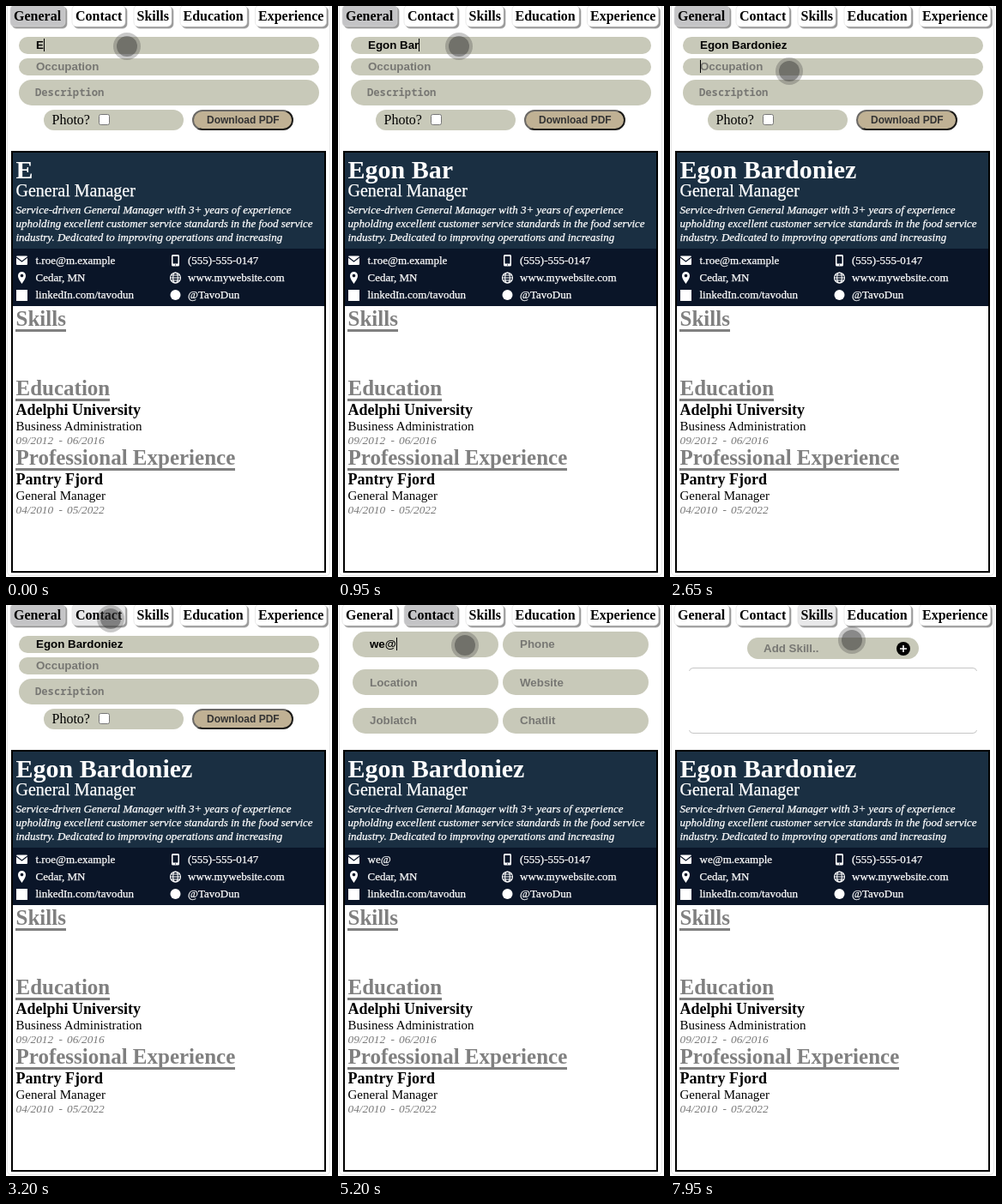
An HTML page for the animation above (8 s loop, 380 by 666 pixels).

```html
<!DOCTYPE html>
<html lang="en">
<head>
<meta charset="utf-8">
<title>Resume builder</title>
<style>
  html, body { margin: 0; width: 100%; height: 100%; overflow: hidden; background: #fff; }
  svg { display: block; width: 380px; height: 666px; }
  text { white-space: pre; font-family: "Liberation Serif", "Times New Roman", serif; }

  .tab rect { fill: #fff; stroke: #dcdcdc; stroke-width: .6; filter: drop-shadow(2px 2px .7px #0006); }
  .tab text { font-size: 16px; font-weight: bold; }
  .field { fill: #c8c9b9; }
  .input { font: bold 13.333px "Liberation Sans", Arial, sans-serif; }
  .hint { fill: #777773; }
  .mono { font: bold 12.2px "Noto Sans Mono", monospace; }
  .button { font: bold 12px "Liberation Sans", Arial, sans-serif; fill: #333; }

  .name, .role, .about, .info { fill: #fff; }
  .role, .about, .info { stroke: #fff; stroke-width: .25px; }
  .name { font-size: 30px; font-weight: bold; }
  .role { font-size: 20px; }
  .about { font-size: 13px; font-style: italic; }
  .info { font-size: 13px; }
  .head { font-size: 25px; font-weight: bold; fill: #808080; }
  .rule { fill: #808080; }
  .place { font-size: 18px; font-weight: bold; }
  .what { font-size: 15px; }
  .date { font-size: 13.333px; font-style: italic; fill: #777; }

  .page, .tab rect { animation: 8s step-end infinite; }
  .general.page { animation-name: page1; }
  .contact.page { animation-name: page2; }
  .skills.page { animation-name: page3; }
  .general.tab rect { animation-name: tab1; }
  .contact.tab rect { animation-name: tab2; }
  .skills.tab rect { animation-name: tab3; }
  #pointer { animation: glide 8s ease-in-out infinite; }

  @keyframes page1 { 0% { visibility: visible } 40.625%, 100% { visibility: hidden } }
  @keyframes page2 { 0% { visibility: hidden } 40.625% { visibility: visible } 92.5%, 100% { visibility: hidden } }
  @keyframes page3 { 0% { visibility: hidden } 92.5%, 100% { visibility: visible } }
  @keyframes tab1 { 0% { fill: #c4c4c6 } 40.625%, 100% { fill: #fff } }
  @keyframes tab2 { 0% { fill: #fff } 38.75% { fill: #e9e9ea } 54.375% { fill: #c4c4c6 } 92.5%, 100% { fill: #fff } }
  @keyframes tab3 { 0% { fill: #fff } 88.125%, 100% { fill: #e9e9ea } }
  @keyframes glide {
    0%, 23.125% { transform: translate(141px, 47px) }
    28.75%, 33.75% { transform: translate(139px, 76px) }
    38.75%, 40.625% { transform: translate(122px, 16px) }
    43.125% { transform: translate(155px, 40px) }
    48.125% { transform: translate(156px, 43px) }
    52.5%, 85% { transform: translate(148px, 47px) }
    87.5% { transform: translate(179px, 27px) }
    89.375%, 98.125% { transform: translate(181px, 23px) }
    99.375%, 100% { transform: translate(212px, 41px) }
  }
</style>
</head>
<body>
<svg viewBox="0 0 380 666">
  <defs>
    <linearGradient id="outset" x2="1" y2="1">
      <stop offset=".5" stop-color="#6b6966"/>
      <stop offset=".5" stop-color="#1c1b19"/>
    </linearGradient>
  </defs>
  <path d="M1.5 0V659Q1.5 664.5 7 664.5H372Q377.5 664.5 377.5 659V0" fill="none" stroke="#e6e6e6"/>

  <g class="general tab"><rect x="5" y="-1" width="64" height="25" rx="5"/><text x="9" y="17">General</text></g>
  <g class="contact tab"><rect x="77" y="-1" width="62" height="25" rx="5"/><text x="81" y="17">Contact</text></g>
  <g class="skills tab"><rect x="149" y="-1" width="44" height="25" rx="5"/><text x="152.5" y="17">Skills</text></g>
  <g class="tab"><rect x="203" y="-1" width="78" height="25" rx="5"/><text x="206.5" y="17">Education</text></g>
  <g class="tab"><rect x="290.5" y="-1" width="83" height="25" rx="5"/><text x="294" y="17">Experience</text></g>

  <g class="general page">
    <rect class="field" x="15" y="36" width="350" height="20" rx="10"/>
    <text class="input" id="nameInput" x="35" y="50"></text>
    <rect class="field" x="15" y="61" width="350" height="20" rx="10"/>
    <text class="input hint" x="35" y="75">Occupation</text>
    <rect class="field" x="15" y="86" width="350" height="30" rx="15"/>
    <text class="mono hint" x="34" y="104.5">Description</text>
    <rect class="field" x="44" y="121" width="163" height="24" rx="12"/>
    <text x="53.5" y="138" font-size="16">Photo?</text>
    <rect x="108.5" y="126.5" width="12" height="12" rx="2" fill="#fff" stroke="#767676"/>
    <rect x="218" y="122" width="116" height="22" rx="11" fill="#c0b194" stroke="url(#outset)" stroke-width="2"/>
    <text class="button" x="234" y="137">Download PDF</text>
  </g>

  <g class="contact page">
    <rect class="field" x="17" y="31" width="170" height="30" rx="15"/>
    <rect class="field" x="192" y="31" width="170" height="30" rx="15"/>
    <rect class="field" x="17" y="75" width="170" height="30" rx="15"/>
    <rect class="field" x="192" y="75" width="170" height="30" rx="15"/>
    <rect class="field" x="17" y="120" width="170" height="30" rx="15"/>
    <rect class="field" x="192" y="120" width="170" height="30" rx="15"/>
    <text class="input" id="mailInput" x="37" y="50"></text>
    <text class="input hint" x="212" y="50">Phone</text>
    <text class="input hint" x="37" y="95">Location</text>
    <text class="input hint" x="212" y="95">Website</text>
    <text class="input hint" x="37" y="139">Joblatch</text>
    <text class="input hint" x="212" y="139">Chatlit</text>
  </g>

  <g class="skills page">
    <rect class="field" x="90" y="38" width="200" height="25" rx="12.5"/>
    <text class="input hint" x="109" y="55">Add Skill..</text>
    <circle cx="272" cy="51" r="8"/>
    <path d="M268 51h8M272 47v8" stroke="#fff" stroke-width="1.6"/>
    <path d="M22.5 77Q23 73.5 27 73.5H353Q357 73.5 357.5 77M22.5 146Q23 149.5 27 149.5H353Q357 149.5 357.5 146" fill="none" stroke="#c6c6c6"/>
  </g>

  <rect x="7" y="170" width="365" height="490" fill="#fff" stroke="#000" stroke-width="2"/>
  <rect x="8" y="171" width="363" height="112" fill="#1a2f42"/>
  <rect x="8" y="283" width="363" height="67" fill="#0a1528"/>
  <text class="name" id="name" x="11.5" y="201"></text>
  <text class="role" x="11.5" y="222">General Manager</text>
  <text class="about" x="11.5" y="242">Service-driven General Manager with 3+ years of experience</text>
  <text class="about" x="11.5" y="258">upholding excellent customer service standards in the food service</text>
  <text class="about" x="11.5" y="274">industry. Dedicated to improving operations and increasing</text>

  <g fill="#fff">
    <rect x="12" y="291.5" width="13" height="10.5" rx="1"/>
    <path d="M12 293l6.5 5 6.5-5" fill="none" stroke="#0a1528" stroke-width="1.2"/>
    <path fill-rule="evenodd" d="M18.5 324C15 319 14 317 14 314.5a4.5 4.5 0 0 1 9 0C23 317 22 319 18.5 324zM18.5 312.7a1.8 1.8 0 1 0 .01 0z"/>
    <rect x="12" y="331" width="13" height="13"/>
    <path fill-rule="evenodd" d="M194.5 290h6q1.5 0 1.5 1.5v10.5q0 1.5-1.5 1.5h-6q-1.5 0-1.5-1.5v-10.5q0-1.5 1.5-1.5zM194.5 292v8.5h6v-8.5zM197 301.5v1h1v-1z"/>
    <circle cx="197.5" cy="337" r="6"/>
  </g>
  <g fill="none" stroke="#fff" stroke-width="1.1">
    <circle cx="197.5" cy="317" r="6"/>
    <ellipse cx="197.5" cy="317" rx="2.8" ry="6"/>
    <path d="M191.5 317h12M192.5 314h10M192.5 320h10"/>
  </g>
  <text class="info" id="mail" x="34.5" y="301"></text>
  <text class="info" x="34.5" y="321">Cedar, MN</text>
  <text class="info" x="34.5" y="341">linkedIn.com/tavodun</text>
  <text class="info" x="212" y="301">(555)-555-0147</text>
  <text class="info" x="212" y="321">www.mywebsite.com</text>
  <text class="info" x="212" y="341">@TavoDun</text>

  <text class="head" x="11.5" y="373">Skills</text>
  <rect class="rule" x="11" y="377" width="59" height="3"/>
  <text class="head" x="11.5" y="454">Education</text>
  <rect class="rule" x="11" y="458" width="110" height="3"/>
  <text class="place" x="11.5" y="477">Adelphi University</text>
  <text class="what" x="11.5" y="495">Business Administration</text>
  <text class="date" y="511"><tspan x="11.5">09/2012</tspan><tspan x="61.5">-</tspan><tspan x="71">06/2016</tspan></text>
  <text class="head" x="11.5" y="535">Professional Experience</text>
  <rect class="rule" x="11" y="539" width="256" height="3"/>
  <text class="place" x="11.5" y="558">Pantry Fjord</text>
  <text class="what" x="11.5" y="576">General Manager</text>
  <text class="date" y="592"><tspan x="11.5">04/2010</tspan><tspan x="61.5">-</tspan><tspan x="71">05/2022</tspan></text>

  <rect id="caret" width="1" height="15"/>
  <g id="pointer">
    <circle r="16" fill="#333" fill-opacity=".27"/>
    <circle r="12" fill="#2a2a2a" fill-opacity=".4"/>
  </g>
</svg>
<script>
  const LOOP = 8000, BLINK = 500;
  const $ = id => document.getElementById(id);
  const nameInput = $('nameInput'), mailInput = $('mailInput'), caret = $('caret');

  const fullName = 'Egon Bardoniez';
  const nameKeys = [...fullName].map((_, i) => i * 130);
  const fullMail = 'we@m.example';
  const mailKeys = [5000, 5100, 5200, 5400, 5500, 5600, 5750, 5900, 6000, 6100, 6200, 6350];

  // Which field has focus, and when
  const focus = [
    { from: 0, to: 2450, x: 35, y: 38, keys: nameKeys, input: nameInput },
    { from: 2450, to: 3250, x: 35, y: 63, keys: [] },
    { from: 4350, to: 7400, x: 37, y: 38, keys: mailKeys, input: mailInput }
  ];

  const typed = (text, keys, t) => text.slice(0, keys.filter(k => k <= t).length);

  function setText(el, text) {
    if (el.textContent !== text) el.textContent = text;
  }

  function drawCaret(t) {
    const f = focus.find(f => t >= f.from && t < f.to);
    const last = f && Math.max(f.from, ...f.keys.filter(k => k <= t));
    const on = f && Math.floor((t - last) / BLINK) % 2 === 0;
    caret.setAttribute('visibility', on ? 'visible' : 'hidden');
    if (!on) return;
    const width = f.input && last >= f.keys[0] ? f.input.getComputedTextLength() : 0;
    caret.setAttribute('x', Math.round(f.x + width));
    caret.setAttribute('y', f.y);
  }

  function draw(t) {
    const name = typed(fullName, nameKeys, t);
    const mail = typed(fullMail, mailKeys, t);
    setText(nameInput, name);
    setText($('name'), name);
    setText(mailInput, mail || 'Email');
    mailInput.classList.toggle('hint', !mail);
    setText($('mail'), mail || 't.roe@m.example');
    drawCaret(t);
  }

  let start;
  function tick(now) {
    start ??= now;
    draw((now - start) % LOOP);
    requestAnimationFrame(tick);
  }
  draw(0);
  requestAnimationFrame(tick);
</script>
</body>
</html>
```
